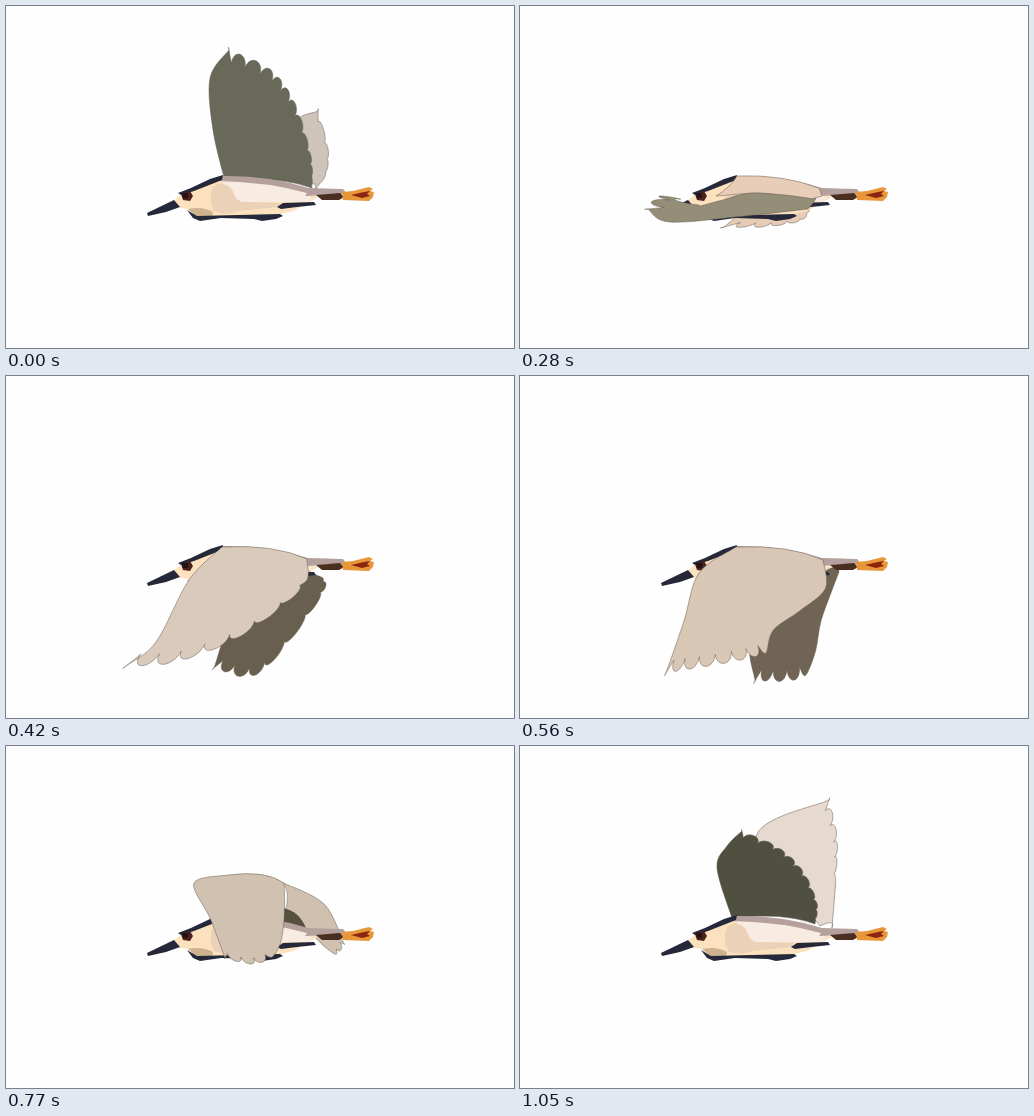
Animation, 508 px wide and 342 px high, one loop 1.12 s. Source, as an HTML page:

```html
<!DOCTYPE html>
<html lang="en">
<head>
<meta charset="utf-8">
<title>Flying bird</title>
<style>
  html, body { margin: 0; width: 100%; height: 100%; overflow: hidden; background: #fefefe; }
  svg { display: block; width: 100%; height: 100%; }
  .wing { stroke: #655b50; stroke-width: .5; }
</style>
</head>
<body>
<svg viewBox="0 0 508 342">
  <g id="behind"><path id="far" class="wing"/></g>
  <path id="gap" fill="#57503f" d="M277 162Q293 165 300 182L277 181Z"/>
  <g>
    <path fill="#fbe1bd" d="M167 195L175 189L213 174Q270 174 302 187L312 191L287 205L270 209L190 211L184 203L174 202Z"/>
    <path fill="#cfb28e" d="M182 203Q196 200 207 206L206 211L192 212Z"/>
    <path fill="#ebd1b7" d="M207 181Q215 175 224 178L230 190L240 196L274 197L272 201L232 205Q222 210 208 205Q202 193 207 181Z"/>
    <path fill="#f7ebe2" d="M217 175Q262 176 300 187L306 192L302 196L236 196Q229 193 228 188Q225 179 217 178Z"/>
    <path fill="#b4a09d" d="M215 170Q262 169 302 182L337 183L341 188L299 190L301 187Q262 176 213 175Z"/>
    <path fill="#4a2f20" d="M310 189L334 187L338 191L333 194L316 194Z"/>
    <path fill="#242839" d="M141 207L168 194L174 201L160 206L142 210Z
      M172 187L185 182L204 173L217 169L216 174L188 185L175 189Z
      M181 204L191 210L274 208L277 210L270 213L256 215L248 213L215 212L194 215L187 212Z
      M271 201L277 197L308 196L310 199L291 201L275 203Z"/>
    <path fill="#4c211c" d="M175 188L184 185L187 190L184 195L177 194Z"/>
    <path fill="#241315" d="M176 187h6v5h-5z"/>
    <path fill="#e8963a" d="M336 186L347 185L363 181L367 183L364 185L368 186L367 191L363 195L337 194Z"/>
    <path fill="#8b2510" d="M345 189L358 186L364 185L361 188L364 190L356 192Z"/>
  </g>
  <path id="shoulder" class="wing" fill="#e8cdb8" d="M217 170Q262 168 299 182L302 190L292 193Q245 184 196 190Q210 182 217 170Z"/>
  <g id="front"><path id="near" class="wing"/></g>
</svg>
<script>
const STEP = 70, STEPS = 16, ROOT_Y = 178;
const el = id => document.getElementById(id);
const mix = (a, b, k) => a + (b - a) * k;
const mixAll = (a, b, k) => a.map((v, i) => Array.isArray(v) ? mixAll(v, b[i], k) : mix(v, b[i], k));
const points = text => text.split(' ').map(pair => pair.split(',').map(Number));
const rgb = hex => [1, 3, 5].map(i => parseInt(hex.slice(i, i + 2), 16));

// lead runs from the root to the tip, trail from the tip back to the root;
// feathers: how many, over which share of the trail, and how deep the notches are
const wing = (color, feathers, lead, trail) =>
  [rgb(color), feathers, points(lead), points(trail)];
const squash = ([color, feathers, ...edges], k) =>
  [color, feathers, ...edges.map(edge => edge.map(([x, y]) => [x, mix(ROOT_Y, y, k)]))];

const raised = {
  near: wing('#69695a', [12, 1, .14], '219,175 207,124 204,72 223,44', '264,63 289,97 305,150 306,182'),
  far: wing('#cfc4ba', [5, .9, .1], '300,180 288,120 312,105', '322,142 320,168 308,185')
};
const forward = {
  near: wing('#4b4a38', [9, .9, .25], '212,172 192,153 170,130 186,100', '231,110 270,128 297,160 290,180'),
  far: wing('#cfc3bd', [4, .9, .12], '290,180 280,152 308,148', '312,163 314,176 305,184')
};
const level = {
  inFront: true, extra: 'shoulder',
  near: wing('#948d78', [4, .5, .15], '288,203 225,210 150,216 128,203', '140,190 180,200 230,187 293,193'),
  far: wing('#e6cbb6', [6, .9, .25], '290,200 230,205 204,221', '243,221 280,215 290,203')
};
const down = {
  inFront: true,
  near: wing('#d9cabb', [8, .8, .14], '216,171 183,204 150,266 120,290', '170,286 235,260 296,212 301,183'),
  far: wing('#695f4f', [8, .8, .12], '290,200 232,235 208,292', '255,296 318,215 304,197')
};
const lowest = {
  inFront: true,
  near: wing('#d9c7b6', [7, .25, .12], '216,171 179,197 164,245 146,297', '246,277 256,247 302,222 303,184'),
  far: wing('#706554', [4, .33, .16], '300,196 234,255 235,305', '286,299 301,245 319,196')
};
const folded = {
  inFront: true, extra: 'gap',
  near: wing('#d1c1b0', [4, .45, .08], '222,129 188,137 204,172 219,212', '247,218 270,207 278,175 278,137'),
  far: wing('#d0c0af', [2, .3, .08], '275,136 318,158 338,198', '328,208 302,185 278,170')
};
const rising = {
  near: wing('#4f503f', [10, .95, .13], '212,172 197,122 207,100 222,85', '258,101 283,125 297,157 295,178'),
  far: wing('#e5d9d0', [5, .7, .09], '300,180 236,92 309,54', '317,90 316,130 312,182')
};
const opening = { near: squash(rising.near, .5), far: squash(rising.far, .5) };

const keys = [[0, raised], [2, forward], [4, level], [6, down], [8, lowest],
  [11, folded], [12, opening], [15, rising], [STEPS, raised]];

// Catmull-Rom: point i of a list, clamped, and the Bezier handles of segment i
const clamped = (list, i) => list[Math.max(0, Math.min(i, list.length - 1))];
function segment(list, i) {
  const [p, a, b, q] = [-1, 0, 1, 2].map(j => clamped(list, i + j));
  return [a, a.map((v, j) => v + (b[j] - p[j]) / 6), b.map((v, j) => v - (q[j] - a[j]) / 6), b];
}
const smooth = list => list.slice(1).map((_, i) => 'C' + segment(list, i).slice(1).join(' ')).join('');

function pointAt(list, u) {
  const at = u * (list.length - 1), i = Math.min(Math.floor(at), list.length - 2), t = at - i;
  let row = segment(list, i);
  while (row.length > 1) row = row.slice(1).map((p, j) => mixAll(row[j], p, t));
  return row[0];
}

function wingPath([, [number, span, depth], lead, trail]) {
  const tip = lead[lead.length - 1], edge = [tip, ...trail];
  const start = lead[0], end = trail[trail.length - 1];
  const bone = pointAt(lead, 1 / 3), count = Math.round(number);
  let d = `M${start}` + smooth(lead), from = tip;
  for (let i = 0; i < count; i++) {
    const u = span * (i + .5) / count;
    const notch = mixAll(pointAt(edge, u), mixAll(bone, end, u), depth * (1 - .4 * u));
    const top = pointAt(edge, span * i / count);
    const reach = top.map((v, j) => (v - (from[j] + notch[j]) / 2) * 4 / 3);
    d += 'C' + [from, notch].map(p => p.map((v, j) => v + reach[j])).join(' ') + ` ${notch}`;
    from = notch;
  }
  const rest = [.25, .5, .75, 1].map(k => pointAt(edge, mix(span, 1, k)));
  const back = mixAll(start, end, .5);
  return d + smooth([from, pointAt(edge, span), ...rest]) + `Q${back[0] + 10},${back[1] - 9} ${start}Z`;
}

function drawWing(id, shape) {
  el(id).setAttribute('d', wingPath(shape));
  el(id).setAttribute('fill', `rgb(${shape[0].map(Math.round)})`);
}

function draw(time) {
  const step = Math.floor(time / STEP) % STEPS;
  const i = keys.findIndex(([at]) => at > step) - 1;
  const [[t0, a], [t1, b]] = keys.slice(i, i + 2);
  const k = (step - t0) / (t1 - t0);
  for (const id of ['far', 'near']) drawWing(id, mixAll(a[id], b[id], k));
  el(a.inFront ? 'front' : 'behind').append(el('near'));
  for (const id of ['shoulder', 'gap']) el(id).style.display = k === 0 && a.extra === id ? '' : 'none';
}

const begin = performance.now();
function tick() {
  draw(performance.now() - begin);
  requestAnimationFrame(tick);
}
tick();
</script>
</body>
</html>
```
